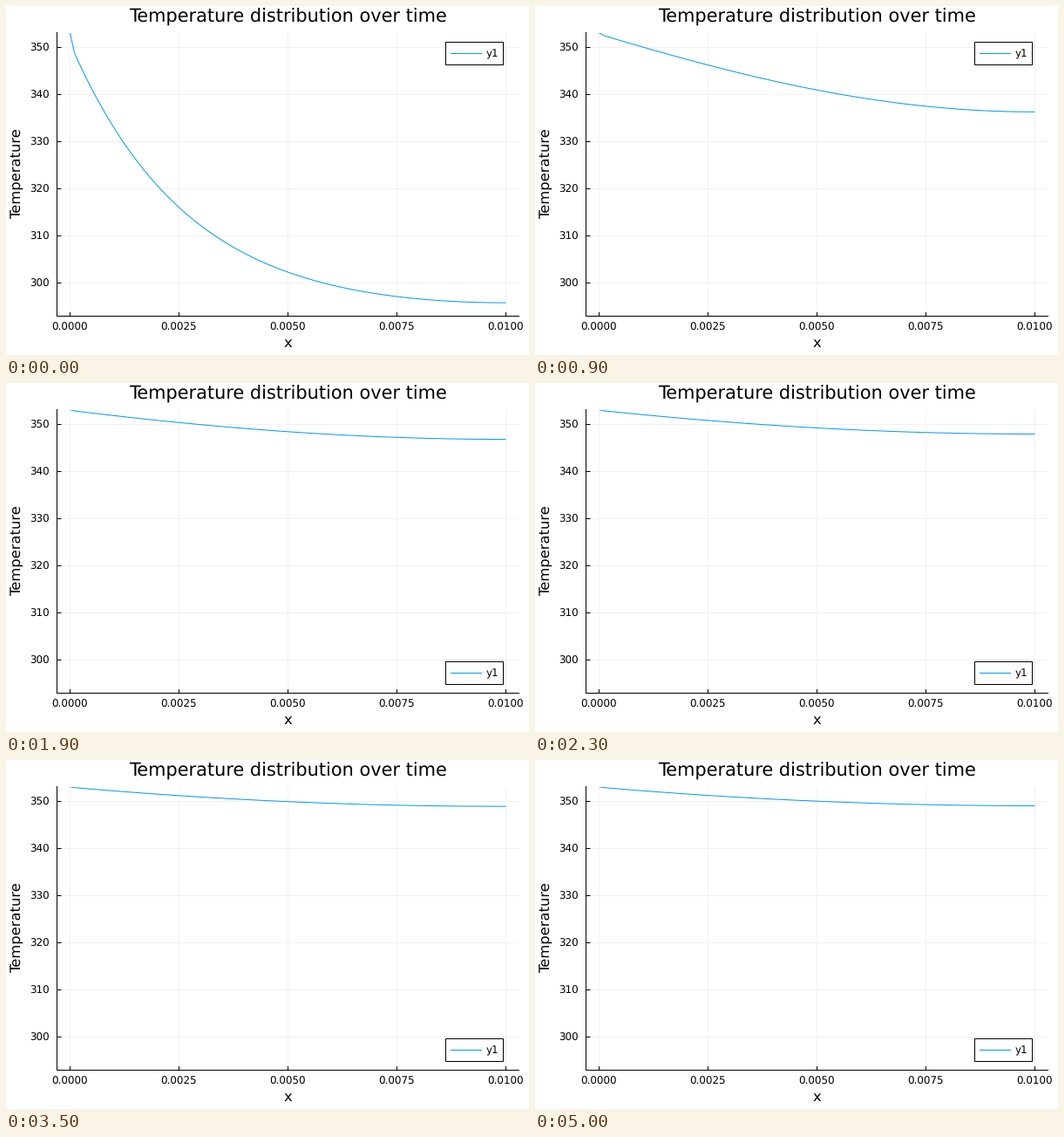
A matplotlib script that plays this animation: 600x400 px, repeating every 5100 ms.

```python
import numpy as np
import matplotlib.pyplot as plt
from matplotlib.animation import FuncAnimation
from matplotlib.patches import Rectangle

W, H, DPI = 600, 400, 100
PX = 72 / DPI                      # points per pixel
FRAMES, STEP_MS = 51, 100
LEFT, RIGHT, TOP, BOTTOM = 58.5, 588.5, 30.75, 355.75
T_MIN, T_MAX = 293, 353
BLUE, GRID = "#009AF9", "#f1f1f1"
TICK, LABEL, TITLE = 11.9, 16.37, 20.83   # font sizes in pixels

plt.rcParams["font.family"] = "DejaVu Sans"
plt.rcParams["text.hinting"] = "none"
plt.rcParams["path.snap"] = False

# Cooling rod: hot wall, insulated tip, weak heat loss; implicit Euler steps
LOSS = 0.3757
STEP = 0.0727
x = np.linspace(0, 1, 101)
depth = (x + 0.01) / 1.01
depth[0] = 0
q = (np.arange(300) + 0.5) * np.pi
amp = 2 * (T_MAX - T_MIN) * q / (q**2 + LOSS**2)
modes = np.sin(np.outer(depth, q))
decay = 1 / (1 + STEP * (q**2 + LOSS**2))
steady = T_MIN + (T_MAX - T_MIN) * np.cosh(LOSS * (1 - depth)) / np.cosh(LOSS)


def temperature(frame):
    temp = steady - modes @ (amp * decay ** (frame + 1))
    temp[0] = T_MAX
    return temp


def to_x(u):
    return 73.5 + 500 * u


def to_y(temp):
    return TOP + (T_MAX - temp) / (T_MAX - T_MIN) * (BOTTOM - TOP)


def crisp(pos):
    """Centre of the pixel that holds a position."""
    return np.floor(pos) + 0.5


fig = plt.figure(figsize=(W / DPI, H / DPI), dpi=DPI, facecolor="white")
ax = fig.add_axes([0, 0, 1, 1])
ax.set_xlim(0, W)
ax.set_ylim(H, 0)
ax.axis("off")


def line(xs, ys, color="black", z=2):
    return ax.plot(xs, ys, color=color, lw=PX, zorder=z,
                   solid_capstyle="butt")[0]


def text(px, py, s, size, ha="center", **kw):
    return ax.text(px, py, s, fontsize=size * PX, ha=ha, va="baseline",
                   zorder=6, **kw)


for i in range(5):
    gx = crisp(to_x(i / 4))
    line([gx, gx], [31, 355], GRID, 1)
    line([gx, gx], [351, 355], z=4)
    text(gx, 371.8, f"{i * 0.0025:.4f}", TICK)

for value in range(300, 351, 10):
    gy = crisp(to_y(value))
    line([LEFT, RIGHT], [gy, gy], GRID, 1)
    line([LEFT, 63.5], [gy, gy], z=4)
    text(50.2, to_y(value) + 4.35, str(value), TICK, "right")

line([LEFT, LEFT], [30, 356], z=4)
line([58, 589], [355.5, 355.5], z=4)
text(323.8, 18.4, "Temperature distribution over time", TITLE)
text(323.5, 391.3, "x", LABEL)
text(17.3, 192.2, "Temperature", LABEL, rotation=90, rotation_mode="anchor")

curve = line(to_x(x), to_y(temperature(0)), BLUE, 3)
curve.set_clip_path(Rectangle((LEFT, 31), RIGHT - LEFT, BOTTOM - 31,
                              transform=ax.transData))

box = Rectangle((504.5, 41.5), 66, 26, fc="white", ec="black", lw=PX, zorder=5)
ax.add_patch(box)
sample = line([510, 546], [54.5, 54.5], BLUE, 6)
name = text(551, 58.9, "y1", TICK, "left")


def draw(frame):
    temp = temperature(frame)
    curve.set_ydata(to_y(temp))
    # The legend drops once the curve reaches the top right quarter
    crowded = np.any(temp[x > 0.765] > T_MAX - (T_MAX - T_MIN) / 4)
    shift = 278 if crowded else 0
    box.set_y(41.5 + shift)
    sample.set_ydata([54.5 + shift] * 2)
    name.set_y(58.9 + shift)
    return curve, box, sample, name


anim = FuncAnimation(fig, draw, frames=FRAMES, interval=STEP_MS,
                     repeat=True, repeat_delay=0, blit=False)
plt.show()
```
